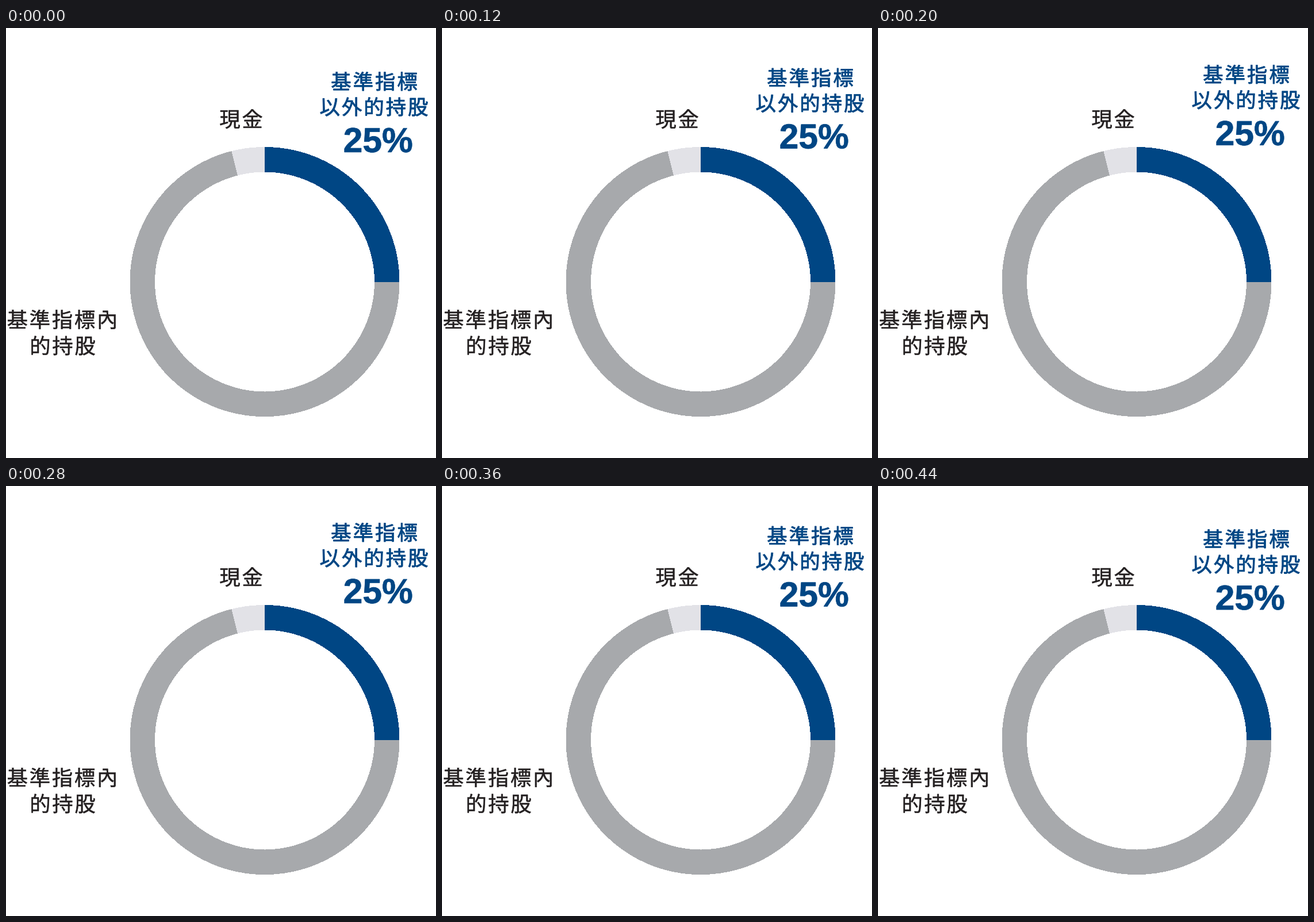
Animation of 748 by 748 pixels, one loop 0.48 s. Source, as a matplotlib script:

```python
import math

import matplotlib.pyplot as plt
from matplotlib.animation import FuncAnimation
from matplotlib.patches import PathPatch, Wedge
from matplotlib.textpath import TextPath
from matplotlib.transforms import Affine2D

SIZE = 748
FRAMES = 12
INTERVAL = 40
RISE = 13  # height of the label's bob in pixels

BLUE = "#004684"
GRAY = "#a7a9ac"
LIGHT = "#e2e2e7"
INK = "#231f20"

CENTER = (450, 441.5)
OUTER = 234
BAND = 42.5

CJK = {"family": "Noto Sans CJK JP"}
BOLD = {"family": "Liberation Sans", "weight": "bold"}

fig = plt.figure(figsize=(SIZE / 100, SIZE / 100), dpi=100, facecolor="white")
ax = fig.add_axes([0, 0, 1, 1])
ax.set_xlim(0, SIZE)
ax.set_ylim(SIZE, 0)
ax.axis("off")


def add_path(path, x, y, color, weight):
    """Place a text path with its origin at (x, y), y pointing down."""
    placed = path.transformed(Affine2D().scale(1, -1).translate(x, y))
    patch = PathPatch(placed, facecolor=color, edgecolor=color,
                      linewidth=weight * 72 / fig.dpi, joinstyle="miter")
    return ax.add_patch(patch)


def spaced_line(text, cx, cy, size, pitch, color, weight):
    """Draw evenly spaced full-width characters centred on (cx, cy)."""
    left = cx - pitch * (len(text) - 1) / 2 - size / 2
    baseline = cy + 0.38 * size
    return [add_path(TextPath((0, 0), char, size=size, prop=CJK),
                     left + i * pitch, baseline, color, weight)
            for i, char in enumerate(text)]


def centered_number(text, cx, baseline, size, color, weight):
    path = TextPath((0, 0), text, size=size, prop=BOLD)
    box = path.get_extents()
    return add_path(path, cx - (box.x0 + box.x1) / 2, baseline, color, weight)


# Hard-edged ring, angles clockwise from the right
for start, end, color in [(0, 255.9, GRAY), (255.9, 270.2, LIGHT),
                          (270.2, 360, BLUE)]:
    ax.add_patch(Wedge(CENTER, OUTER, start, end, width=BAND,
                       facecolor=color, linewidth=0, antialiased=False))

# Still labels
for text, cx, cy in [("現金", 409, 158.2), ("基準指標內", 98, 507),
                     ("的持股", 98.5, 552.5)]:
    spaced_line(text, cx, cy, 36.5, 39.1, INK, 0.5)

# Bobbing label
label = spaced_line("基準指標", 640.5, 92.8, 35.5, 38.4, BLUE, 0.9)
label += spaced_line("以外的持股", 640, 137, 35.5, 38.4, BLUE, 0.9)
label.append(centered_number("25%", 647.5, 215.9, 60.5, BLUE, 0.8))


def update(frame):
    lift = RISE * (1 - math.cos(2 * math.pi * frame / FRAMES)) / 2
    shift = Affine2D().translate(0, -lift) + ax.transData
    for patch in label:
        patch.set_transform(shift)
    return label


anim = FuncAnimation(fig, update, frames=FRAMES, interval=INTERVAL,
                     repeat=True, repeat_delay=0, blit=False)
plt.show()
```
